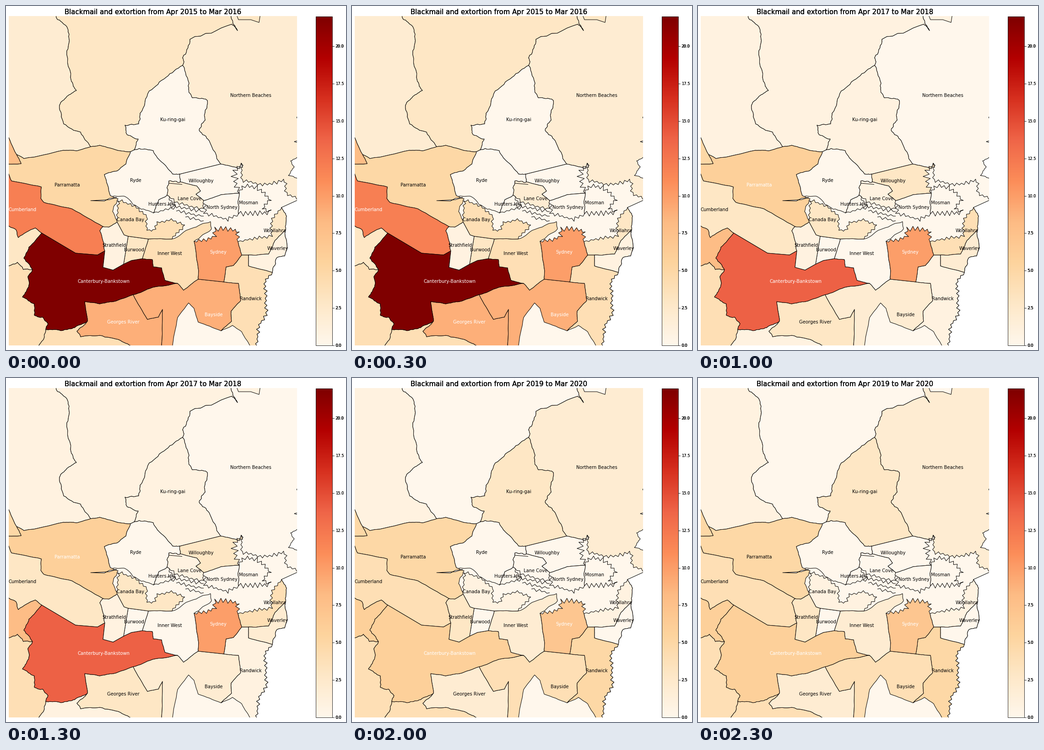
A matplotlib script for the animation above (2.5 s loop, 743 by 753 pixels).

```python
import numpy as np
import matplotlib.pyplot as plt
from matplotlib.animation import FuncAnimation
from matplotlib.patches import Polygon, Rectangle

W, H, DPI = 743, 753, 64
LEFT, TOP, RIGHT, BOTTOM = 6, 22, 636, 743
BAR_L, BAR_R, BAR_T, BAR_B = 677.1, 713.1, 22.8, 742.8
VMAX = 22
CMAP = plt.get_cmap("OrRd")


def pt(px):
    return px * 72 / DPI


fig = plt.figure(figsize=(W / DPI, H / DPI), dpi=DPI, facecolor="white")
ax = fig.add_axes([0, 0, 1, 1])
ax.axis("off")

land = Rectangle((LEFT, TOP), RIGHT - LEFT, BOTTOM - TOP, fc=CMAP(0.0), ec="none")
ax.add_patch(land)

arcs = {}


def wander(pts, rough, rng):
    """Split the line again and again, pushing each midpoint sideways."""
    for _ in range(3):
        step = np.diff(pts, axis=0)
        size = np.maximum(np.hypot(*step.T), 1)[:, None]
        shift = rng.uniform(-rough, rough, size.shape) * np.minimum(1, size / 8)
        normal = step[:, ::-1] * [-1, 1] / np.sqrt(size)
        pts = np.insert(pts, np.arange(1, len(pts)), pts[:-1] + step / 2 + normal * shift, axis=0)
    return pts


def indent(pts, depth, rng, pitch=5):
    """Turn the line into a shore of alternating points and coves."""
    dist = np.r_[0, np.cumsum(np.hypot(*np.diff(pts, axis=0).T))]
    n = max(int(dist[-1] / pitch), 3)
    at = np.linspace(0, dist[-1], n)
    line = np.stack([np.interp(at, dist, c) for c in pts.T], axis=1)
    normal = np.gradient(line, axis=0)[:, ::-1] * [-1, 1]
    normal /= np.maximum(np.hypot(*normal.T), 1e-6)[:, None]
    push = depth * rng.uniform(.2, 1, n) * (-1) ** np.arange(n)
    push[[0, -1]] = 0
    return line + normal * push[:, None]


def arc(name, *xy, rough=.15, cove=0):
    """Store a border through a few key points."""
    rng = np.random.default_rng(len(arcs))
    pts = np.reshape(xy, (-1, 2)).astype(float)
    arcs[name] = indent(pts, cove, rng) if cove else wander(pts, rough, rng)


def outline(spec):
    """Join arcs; '-name' runs backwards, 'x,y' is a single corner."""
    parts = []
    for word in spec.split():
        if "," in word:
            parts.append([[float(v) for v in word.split(",")]])
        elif word[0] == "-":
            parts.append(arcs[word[1:]][::-1])
        else:
            parts.append(arcs[word])
    return np.concatenate(parts)


def shape(points, color, closed=True):
    patch = Polygon(points, closed=closed, fc=color, ec="black",
                    lw=pt(1.0), joinstyle="round")
    ax.add_patch(patch)
    patch.set_clip_path(land)
    return patch


def text(x, y, s, px, **kw):
    return ax.text(x, y, s, fontsize=pt(px), family="DejaVu Sans", va="baseline", **kw)


# Northern borders
arc("hi_ho", 107, 10, 112, 29, 130, 42, 138, 62, 133, 98, 143, 165, 154, 185, 133, 198,
    117, 217, 126, 258, 163, 276, 185, 308, rough=.4)
arc("hi_pa", 185, 308, 155, 317, 125, 316, 39, 334, 23, 325)
arc("hi_bl", 23, 325, 0, 276)
arc("bl_pa", 23, 325, 33, 345, 0, 346)
arc("ho_pa", 185, 308, 205, 305, 250, 317, 272, 319)
arc("ho_ry", 272, 319, 280, 315, rough=0)
arc("ho_ku", 280, 315, 289, 291, 265, 282, 260, 261, 290, 258, 293, 235, 313, 186, 350, 156,
    386, 130, rough=.4)
arc("ho_nb", 386, 130, 388, 108, 402, 73, 493, 40, 506, 54, 488, 10, rough=.6)
arc("ku_nb", 386, 130, 398, 175, 407, 201, 440, 207, 435, 250, 422, 272, 444, 295, 469, 346,
    rough=.6)
arc("ku_wi", 469, 346, 380, 368, rough=0)
arc("ku_ry", 280, 315, 291, 312, 322, 317, 335, 337, 364, 368, 380, 368, rough=.3)
arc("wi_nb", 469, 346, 510, 356, 514, 344)
arc("nb_s", 514, 344, 516, 382, 562, 392, 592, 386, 610, 382, 612, 410, 640, 424, cove=4)

# Western borders
arc("pa_ry", 272, 319, 262, 346, 243, 361, 215, 369, 228, 415, rough=.2)
arc("pa_cu", 0, 350, 12, 383, 77, 396, 76, 421, 83, 430, 144, 444, 212, 483)
arc("pa_e", 228, 415, 245, 422, 233, 450, 243, 473, rough=.4)
arc("pa_st", 243, 473, 225, 484, 212, 483)
arc("cu_st", 212, 483, 205, 492, 216, 536, rough=.3)
arc("cu_cb", 216, 536, 200, 545, 152, 541, 78, 497, rough=0)
arc("cu_fa", 78, 497, 64, 486, 27, 507, 22, 490, 0, 477, rough=.3)
arc("fa_cb", 78, 497, 50, 528, 39, 552, 58, 577, rough=.3)
arc("fa_li", 58, 577, 38, 577, 25, 561, 0, 574, rough=.4)
arc("li_cb", 58, 577, 48, 592, 50, 611, 36, 637, 62, 652, 62, 677, 80, 681, 92, 695, 87, 708,
    rough=.4)
arc("li_su", 87, 708, 82, 730, 67, 750, rough=.4)
arc("su_cb", 87, 708, 125, 710, 150, 704, 178, 690, rough=.4)
arc("su_gr", 178, 690, 155, 712, 163, 724, 205, 721, 250, 732, 280, 750, rough=.3)
arc("gr_cb", 178, 690, 172, 647, 205, 652, 235, 647, 278, 632)
arc("gr_ba", 278, 632, 309, 686, 333, 681, 342, 664, 340, 750, rough=.1)

# Inner borders
arc("ba_cb", 278, 632, 320, 616, 375, 607)
arc("iw_cb", 375, 607, 347, 600, 340, 573, 322, 571, 320, 555, 298, 553)
arc("bu_cb", 298, 553, 274, 557, 257, 565, rough=0)
arc("st_cb", 257, 565, 234, 578, 212, 572, 216, 536, rough=0)
arc("st_bu", 257, 565, 267, 504, rough=0)
arc("bu_iw", 298, 553, 311, 510, rough=.1)
arc("cy_st", 243, 473, 258, 501, 267, 504, rough=0)
arc("cy_bu", 267, 504, 311, 510, rough=0)
arc("cy_iw", 311, 510, 363, 510)
arc("cy_n", 363, 510, 390, 480, 362, 468, 330, 474, 322, 493, 306, 490, 308, 460, 283, 440,
    246, 424, 243, 473, cove=3.5)
arc("iw_n", 363, 510, 405, 487, 447, 472, 449, 488, 411, 515, rough=.4)
arc("iw_sy", 411, 515, 421, 580, 420, 598)
arc("iw_ba", 420, 598, 388, 622, 375, 607)
arc("sy_ba", 420, 598, 476, 604, rough=0)
arc("sy_ra", 476, 604, 481, 571, 497, 568, 515, 545, rough=.1)
arc("sy_wo", 515, 545, 507, 516)
arc("sy_n", 507, 516, 508, 491, 459, 487, 454, 507, 411, 515, cove=6)

# Eastern and southern borders
arc("ra_ba", 476, 604, 508, 607, 513, 645, 492, 668, 493, 690, 470, 711)
arc("ba_by", 470, 711, 420, 692, 411, 662, 399, 650, 375, 682, 363, 750, rough=.1)
arc("ra_by", 470, 711, 495, 699, 515, 713, 537, 750)
arc("ra_wo", 515, 545, 530, 545, rough=0)
arc("ra_wa", 530, 545, 530, 569, 582, 583, rough=.1)
arc("wo_wa", 530, 545, 574, 543, 588, 513, 611, 490)
arc("wo_n", 602, 441, 580, 470, 580, 503, 525, 512, 507, 516, cove=4)
arc("coast_wo", 602, 441, 613, 460, 611, 490, rough=.3)
arc("coast_wa", 611, 490, 609, 547, 591, 552, 582, 583, rough=.5)
arc("coast_ra", 582, 583, 566, 600, 569, 675, 552, 700, 547, 750, cove=4)

# Harbour shores
arc("wi_e", 514, 344, 498, 365, 500, 390, 510, 410, cove=9)
arc("wi_ns", 510, 410, 470, 413, 432, 426, rough=.1)
arc("wi_lc", 432, 426, 415, 412, 425, 405, 417, 394, 381, 385, rough=.1)
arc("wi_ry", 381, 385, 380, 368, rough=.3)
arc("ry_lc", 381, 385, 356, 383, 352, 414, rough=.6)
arc("lc_s", 352, 414, 372, 430, 430, 445, 432, 426, cove=3)
arc("hh_ry", 322, 453, 334, 424, 352, 414, rough=.3)
arc("hh_s", 352, 414, 371, 441, 322, 453, cove=3)
arc("ry_s", 228, 415, 262, 418, 296, 445, 322, 453, rough=.5)
arc("ns_mo", 510, 410, 508, 455, rough=.3)
arc("ns_s", 508, 455, 485, 468, 436, 455, 432, 426, cove=5)
arc("mo_n", 510, 410, 520, 394, 550, 398, 578, 425, 560, 440, 578, 452, 508, 455, cove=6)
arc("bite_1", 645, 290, 630, 297, 645, 304, rough=.5)
arc("bite_2", 645, 328, 622, 339, 630, 352, 617, 371, 645, 379, rough=.5)

shape(outline("650,420 635,426 coast_wo coast_wa coast_ra 650,750"), "white")

regions = []
labels = []


def region(values, spec, name=None, x=0, y=0):
    """One yearly count per step; counts above 5 get a white label."""
    regions.append((shape(outline(spec), "white"), values))
    if name:
        labels.append((text(x, y + 4, name, 10, ha="center", zorder=5), values))


region((2, 2, 1, 0, 1), "hi_ho hi_pa hi_bl 0,10")
region((3, 3, 1, 1, 0), "ho_pa ho_ry ho_ku ho_nb hi_ho")
region((2, 2, 0, 0, 2), "-ho_nb ku_nb wi_nb nb_s 650,424 650,10",
       "Northern Beaches", 534.5, 195)
region((3, 3, 1, 1, 0), "500,10 508,30 535,30 553,36 557,10")
region((0, 1, 1, 0, 3), "ho_ku ku_nb ku_wi -ku_ry", "Ku-ring-gai", 364, 248)
region((5, 8, 6, 3, 5), "hi_pa bl_pa pa_cu -pa_st -pa_e -pa_ry -ho_pa",
       "Parramatta", 134, 391)
region((8, 5, 5, 10, 5), "hi_bl -bl_pa")
region((12, 6, 3, 11, 4), "pa_cu cu_st cu_cb cu_fa", "Cumberland", 36.5, 445)
region((3, 11, 8, 4, 6), "-cu_fa fa_cb fa_li")
region((4, 4, 4, 4, 4), "-fa_li li_cb li_su 0,750")
region((4, 1, 1, 3, 4), "su_cb su_gr -li_su")
region((9, 1, 3, 3, 2), "gr_cb gr_ba -su_gr", "Georges River", 256.5, 691)
region((9, 0, 2, 4, 4), "ba_cb -iw_ba sy_ba ra_ba ba_by -gr_ba", "Bayside", 453.5, 675)
region((22, 9, 14, 13, 6),
       "-cu_cb -st_cb -bu_cb -iw_cb -ba_cb -gr_cb -su_cb -li_cb -fa_cb",
       "Canterbury-Bankstown", 213.5, 601.5)
region((4, 3, 1, 5, 5), "ra_ba ra_by -coast_ra -ra_wa -ra_wo -sy_ra",
       "Randwick", 534.5, 640)
region((4, 4, 0, 1, 2), "iw_n iw_sy iw_ba iw_cb bu_iw cy_iw", "Inner West", 357.5, 541)
region((10, 8, 10, 7, 7), "iw_sy sy_ba sy_ra sy_wo sy_n", "Sydney", 464, 538.5)
region((3, 0, 0, 2, 0), "bu_cb st_bu cy_bu -bu_iw", "Burwood", 280, 533)
region((1, 2, 1, 3, 3), "cy_st -st_bu st_cb -cu_st -pa_st", "Strathfield", 237, 523)
region((4, 1, 3, 1, 1), "cy_st cy_bu cy_iw cy_n", "Canada Bay", 271.5, 467)
region((3, 0, 4, 2, 1), "wo_wa -coast_wo wo_n -sy_wo ra_wo", "Woollahra", 587.5, 491)
region((1, 1, 2, 0, 0), "wo_wa coast_wa -ra_wa", "Waverley", 593.5, 530.5)
region((0, 1, 0, 2, 0), "pa_ry ry_s hh_ry -ry_lc wi_ry -ku_ry -ho_ry", "Ryde", 283, 381)
region((0, 0, 3, 0, 0), "-ku_wi wi_nb wi_e wi_ns wi_lc wi_ry", "Willoughby", 426, 382)
region((2, 0, 1, 2, 0), "wi_lc ry_lc lc_s", "Lane Cove", 401.5, 421)
region((0, 0, 0, 0, 0), "hh_ry hh_s", "Hunters Hill", 340.5, 433)
region((0, 3, 0, 2, 0), "-wi_ns ns_mo ns_s", "North Sydney", 472, 440)
region((0, 0, 0, 0, 0), "mo_n -ns_mo", "Mosman", 530.5, 430)

# Sea cut into the beaches, river arm and loose shore lines
for bite in ("bite_1", "bite_2"):
    shape(arcs[bite], "white", closed=False)
shape(outline("185,426 215,427 226,421 242,419 226,424"), CMAP(0.0))
for k in range(3):
    arc(f"shore_{k}", 352 + 20 * k, 436 + 13 * k, 432, 450 + 10 * k, cove=4)
    shape(arcs[f"shore_{k}"], "none", closed=False)
shape([(356, 388), (385, 390.5)], "none", closed=False)
shape([(635, 242), (635, 245)], "none", closed=False)

# Colour bar
ax.imshow(np.linspace(1, 0, 256)[:, None], cmap=CMAP, vmin=0, vmax=1, aspect="auto",
          extent=(BAR_L, BAR_R, BAR_B, BAR_T), interpolation="nearest")
ax.add_patch(Rectangle((BAR_L, BAR_T), BAR_R - BAR_L, BAR_B - BAR_T, fc="none", ec="black",
                       lw=pt(.8)))
for tick in np.arange(0, 20.1, 2.5):
    y = BAR_B - tick * (BAR_B - BAR_T) / VMAX
    ax.plot([BAR_R, BAR_R + 3.4], [y, y], color="black", lw=pt(.8))
    for dx in (0, .5):
        text(719.6 + dx, y + 3, f"{tick:.1f}", 8.33)

# Struck several times for the heavy look
titles = [text(321, 17.8, "", 14.9, ha="center") for _ in range(3)]

ax.set_xlim(0, W)
ax.set_ylim(H, 0)


def update(i):
    for patch, values in regions:
        patch.set_facecolor(CMAP(values[i] / VMAX))
    for label, values in labels:
        label.set_color("white" if values[i] > 5 else "black")
    for title in titles:
        title.set_text(f"Blackmail and extortion from Apr {2015 + i} to Mar {2016 + i}")
    return []


anim = FuncAnimation(fig, update, frames=5, interval=500, repeat=True, repeat_delay=0)
plt.show()
```
